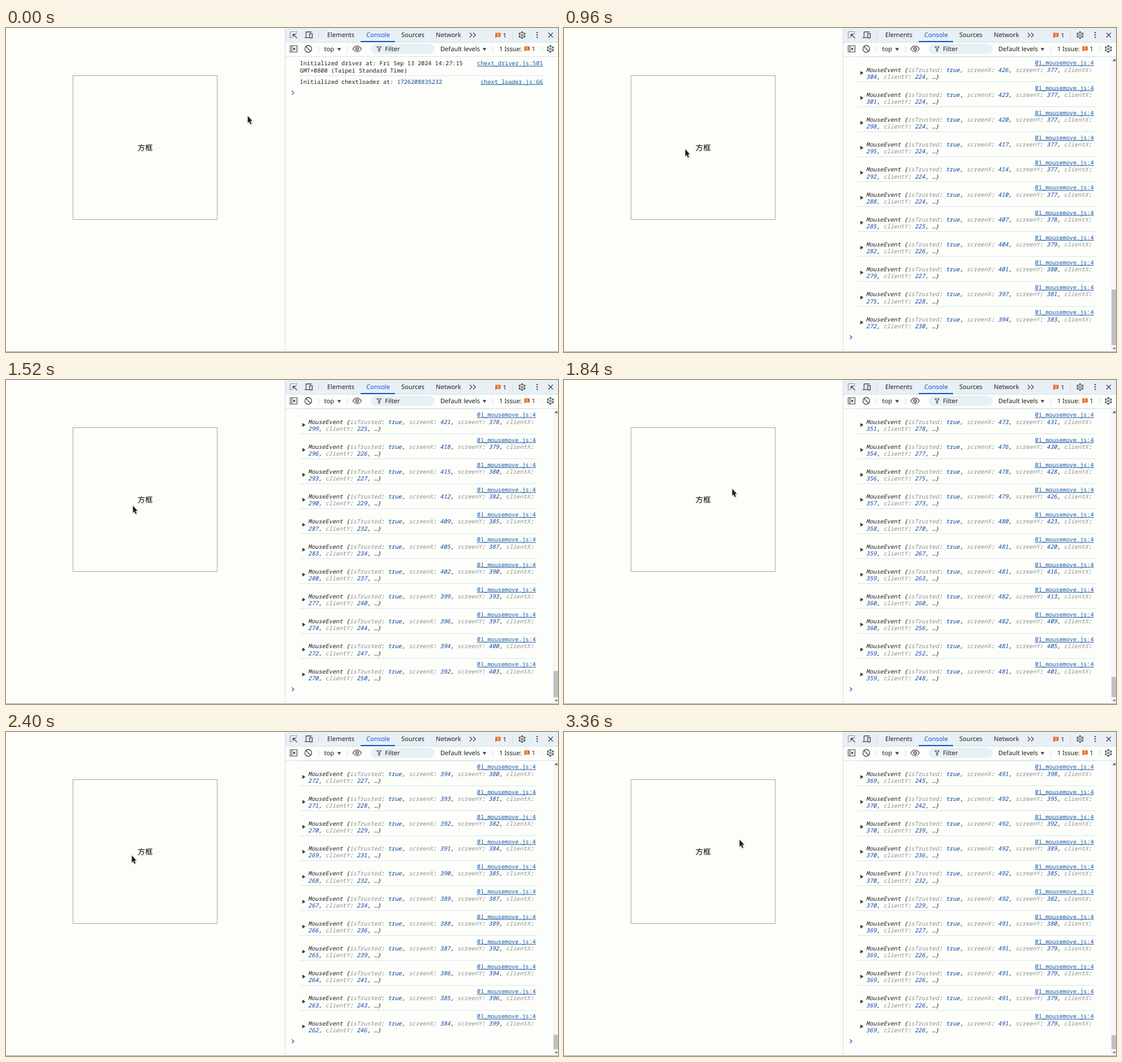
Animation, 976 px wide and 574 px high, one loop 3.52 s. Source, as an HTML page with a canvas:

```html
<!DOCTYPE html>
<html lang="zh-Hant">
<head>
<meta charset="utf-8">
<title>mousemove</title>
<style>
html, body { margin: 0; width: 100%; height: 100%; overflow: hidden; background: #fdfefa; }
canvas { display: block; }
</style>
</head>
<body>
<canvas id="stage" width="976" height="574"></canvas>
<script>
const c = document.getElementById('stage').getContext('2d');
const LOOP = 3520, STEP = 80, ZOOM = 0.84, RATE = 0.12, LOG_START = 480, LOG_END = 2960, LAG = 40;
const ROW = 44.21, CHAR = 6.14, VIEW = 524;
const BG = '#fdfefa', BAR = '#e8f0f5', LINE = '#d3e3f2', INK = '#1f1f1f', ICON = '#44474a',
  BLUE = '#0b57d0', LINK = '#1558a8', VALUE = '#0842a0', KEY = '#8c8e8c', ORANGE = '#e5732a';
const UI = '11.1px "Noto Sans", "Open Sans", sans-serif';
const MONO = '10.23px "Noto Sans Mono", "DejaVu Sans Mono", monospace';
c.textRendering = 'geometricPrecision';

// Turning points of the pointer: time, x, y
const path = [
  [160, 427, 155], [440, 367, 183], [560, 338, 201], [830, 256, 188], [920, 227, 194], [960, 214, 214],
  [1080, 246, 243], [1230, 300, 206], [1390, 251, 189], [1520, 224, 222], [1710, 296, 233], [1840, 297, 192],
  [2000, 262, 177], [2270, 228, 191], [2400, 222, 218], [2560, 265, 244], [2830, 310, 206], [2890, 310, 190]
];
const last = path.length - 1;

const clamp = (v, lo, hi) => Math.max(lo, Math.min(hi, v));
const countAt = t => Math.max(0, Math.round((Math.min(t, LOG_END) - LOG_START) * RATE));

// Speed along one axis at a turning point; the pointer rests at both ends
function slope(i, axis) {
  if (i === 0 || i === last) return 0;
  const a = path[i - 1], b = path[i + 1];
  return (b[axis] - a[axis]) / (b[0] - a[0]);
}

// Smooth curve through the turning points
function pointerAt(time) {
  const t = clamp(time, path[0][0], path[last][0]);
  const i = Math.max(1, path.findIndex(p => p[0] >= t));
  const a = path[i - 1], b = path[i], span = b[0] - a[0], u = (t - a[0]) / span, v = 1 - u;
  return [1, 2].map(k =>
    v * v * ((1 + 2 * u) * a[k] + u * span * slope(i - 1, k)) +
    u * u * ((1 + 2 * v) * b[k] - v * span * slope(i, k)));
}

const eventAt = i => pointerAt(LOG_START + i / RATE - LAG).map(v => Math.round(v / ZOOM));

function rect(x, y, w, h, color) {
  c.fillStyle = color;
  c.fillRect(x, y, w, h);
}

function text(s, x, y, color = INK, font = UI, align = 'left') {
  c.font = font;
  c.fillStyle = color;
  c.textAlign = align;
  c.fillText(s, x, y);
}

function stroke(d, color = ICON, width = 1.2) {
  c.strokeStyle = color;
  c.lineWidth = width;
  c.stroke(new Path2D(d));
}

function fill(d, color = ICON) {
  c.fillStyle = color;
  c.fill(new Path2D(d));
}

function circle(x, y, r, width = 1.2) {
  c.beginPath();
  c.arc(x, y, r, 0, 7);
  c.strokeStyle = ICON;
  c.lineWidth = width;
  c.stroke();
}

function gear(x, y) {
  circle(x, y, 4.6, 1.2);
  circle(x, y, 1.7, 1.1);
  for (let a = 0; a < 6; a++) {
    const dx = Math.cos(a * Math.PI / 3 + Math.PI / 6), dy = Math.sin(a * Math.PI / 3 + Math.PI / 6);
    stroke(`M${x + dx * 4.8} ${y + dy * 4.8}L${x + dx * 6.6} ${y + dy * 6.6}`, ICON, 2.4);
  }
}

function issue(x, y) {
  fill(`M${x} ${y}h9.5v7.5h-7.5l-2 2z`, ORANGE);
  rect(x + 4.2, y + 1.5, 1.2, 3, '#fff');
  rect(x + 4.2, y + 5.2, 1.2, 1.2, '#fff');
}

function toolbars() {
  rect(494, 0, 482, 25, BAR);
  rect(494, 25, 482, 26, BG);
  rect(494, 25, 482, 1, LINE);
  rect(494, 50, 482, 1, LINE);
  for (const x of [552, 895]) rect(x, 6, 1, 13, '#cbd8e8');
  for (const x of [552, 603, 860, 948]) rect(x, 31, 1, 13, LINE);

  text('Elements', 568, 16.4);
  text('Console', 637, 16.4, BLUE);
  text('Sources', 699, 16.4);
  text('Network', 760, 16.4);
  rect(627, 23, 61, 2, BLUE);
  text('1', 878.5, 16.9);
  issue(865, 8.5);

  // Inspect and device icons
  c.setLineDash([1.6, 1.5]);
  stroke('M506 17.5H502.5V6.5H513.5V10');
  c.setLineDash([]);
  stroke('M514.5 18L508 11.5M507.5 16V11.2H512.5', ICON, 1.4);
  stroke('M540.5 7H530.5V15.5M528 17H535.5M537 10H541.5V17.5H537Z', ICON, 1.3);

  stroke('M820 8.5L824 12.5L820 16.5M826 8.5L830 12.5L826 16.5', ICON, 1.3);
  gear(912.5, 12.5);
  for (const y of [7, 11.2, 15.4]) rect(938, y, 2.2, 2.2, ICON);
  stroke('M959 8.5L967 16.5M967 8.5L959 16.5', ICON, 1.4);

  // Sidebar, clear, eye and filter icons
  stroke('M502.5 31.5H514.5V42.5H502.5ZM505.5 31.5V42.5');
  fill('M508 34.2L512.3 37L508 39.8Z');
  circle(534.5, 37, 6, 1.3);
  stroke('M530.3 32.8L538.7 41.2', ICON, 1.3);
  stroke('M613 37Q620.5 26.8 628.5 37Q620.5 47.2 613 37Z');
  circle(620.7, 37, 2.3, 1.5);
  c.beginPath();
  c.roundRect(645, 28, 113, 18, 9);
  c.fillStyle = BAR;
  c.fill();
  stroke('M656 33.2H663.5L660.6 37V41H658.9V37Z', ICON, 1.1);

  text('top', 562.5, 41.2);
  text('Filter', 670, 41.2);
  text('Default levels', 768, 41.2);
  text('1 Issue:', 872, 41.2);
  text('1', 929.5, 41.2);
  fill('M585.5 35.5H592.5L589 40.5Z');
  fill('M842.5 35.5H849.5L846 40.5Z');
  issue(916.5, 32.5);
  gear(962.5, 37);
}

function link(s, right, y) {
  text(s, right, y + 3.7, LINK, MONO, 'right');
  rect(right - s.length * CHAR, y + 4.7, s.length * CHAR, 1, LINK);
}

const separator = (y, right) => rect(519, y - 0.5, right - 519, 1, LINE);

// Object preview line: keys grey, values blue, the rest dark
function preview(s, x, y) {
  for (const m of s.matchAll(/(\w+)(?=:)|\b(true|\d+)\b|MouseEvent|[{},:…]+/g))
    text(m[0], x + m.index * CHAR, y + 3.7, m[1] ? KEY : m[2] ? VALUE : INK, 'italic ' + MONO);
}

function eventRow([x, y], top, edge) {
  link('01_mousemove.js:4', edge - 3, top);
  preview(`MouseEvent {isTrusted: true, screenX: ${x + 122}, screenY: ${y + 153}, clientX:`, 534, top + 12.3);
  preview(`${x}, clientY: ${y}, …}`, 534, top + 24.4);
  fill(`M524 ${top + 14.6}L529.5 ${top + 18}L524 ${top + 21.4}Z`, '#3c3f41');
}

function scrollbar(scroll) {
  const size = Math.max(25, 500 * VIEW / (VIEW + scroll));
  rect(967, 51, 9, 522, '#f6f7f4');
  rect(968, 562 - size, 8, size, '#c0c2c0');
  fill('M970 58.5L973 54.5L976 58.5Z', '#555');
  fill('M970 566.5L973 570L976 566.5Z', '#777');
}

function consoleView(n) {
  const scroll = Math.max(0, n * ROW - 433.2), edge = scroll ? 940 : 952.5;
  const rowTop = i => 114.7 + i * ROW - scroll;
  c.save();
  c.beginPath();
  c.rect(494, 51, 482, 522);
  c.clip();
  if (scroll < 100) {
    text('Initialized driver at: Fri Sep 13 2024 14:27:15', 519.5, 66.4 - scroll, INK, MONO);
    text('GMT+0800 (Taipei Standard Time)', 519.5, 78.7 - scroll, INK, MONO);
    link('chext_driver.js:501', edge - 3, 62.6 - scroll);
    separator(84.5 - scroll, edge);
    text('Initialized chextloader at: ', 519.5, 98.8 - scroll, INK, MONO);
    text('1726208835232', 519.5 + 28 * CHAR, 98.8 - scroll, VALUE, MONO);
    link('chext_loader.js:66', edge - 3, 95 - scroll);
    if (n) separator(104.5 - scroll, edge);
  }
  for (let i = Math.max(0, n - 12); i < n; i++) {
    eventRow(eventAt(i), rowTop(i), edge);
    if (i < n - 1) separator(rowTop(i) + 33.7, edge);
  }
  const y = rowTop(n);
  stroke(`M505.3 ${y - 3.4}L509 ${y}L505.3 ${y + 3.4}`, '#2a6fcf', 1.4);
  if (scroll) scrollbar(scroll);
  c.restore();
}

function pointer([x, y]) {
  const arrow = 'M0.5 0V13L3.4 10.4L5.5 15.5L7.7 14.5L5.6 9.6L9.2 9.2Z';
  c.save();
  c.translate(x, y + 0.8);
  c.scale(0.9, 0.95);
  c.shadowColor = 'rgba(0,0,0,.3)';
  c.shadowBlur = 2;
  c.shadowOffsetX = c.shadowOffsetY = 0.7;
  stroke(arrow, '#fff', 1.4);
  c.shadowColor = 'transparent';
  fill(arrow, '#1c1c1c');
  c.restore();
}

function draw(now) {
  const t = Math.floor(now % LOOP / STEP) * STEP;
  rect(0, 0, 976, 574, BG);
  c.strokeStyle = '#a6a7a5';
  c.lineWidth = 1;
  c.strokeRect(118.5, 84.5, 255, 255);
  text('方框', 246, 217, '#000', '13.44px "Noto Sans CJK TC", "Noto Sans CJK", sans-serif', 'center');
  rect(493, 0, 1, 574, '#d0dae6');
  consoleView(countAt(t));
  toolbars();
  rect(0, 573, 976, 1, '#a3a5a3');
  pointer(pointerAt(t));
}

const start = performance.now();
function tick() {
  draw(performance.now() - start);
  requestAnimationFrame(tick);
}
tick();
</script>
</body>
</html>
```
